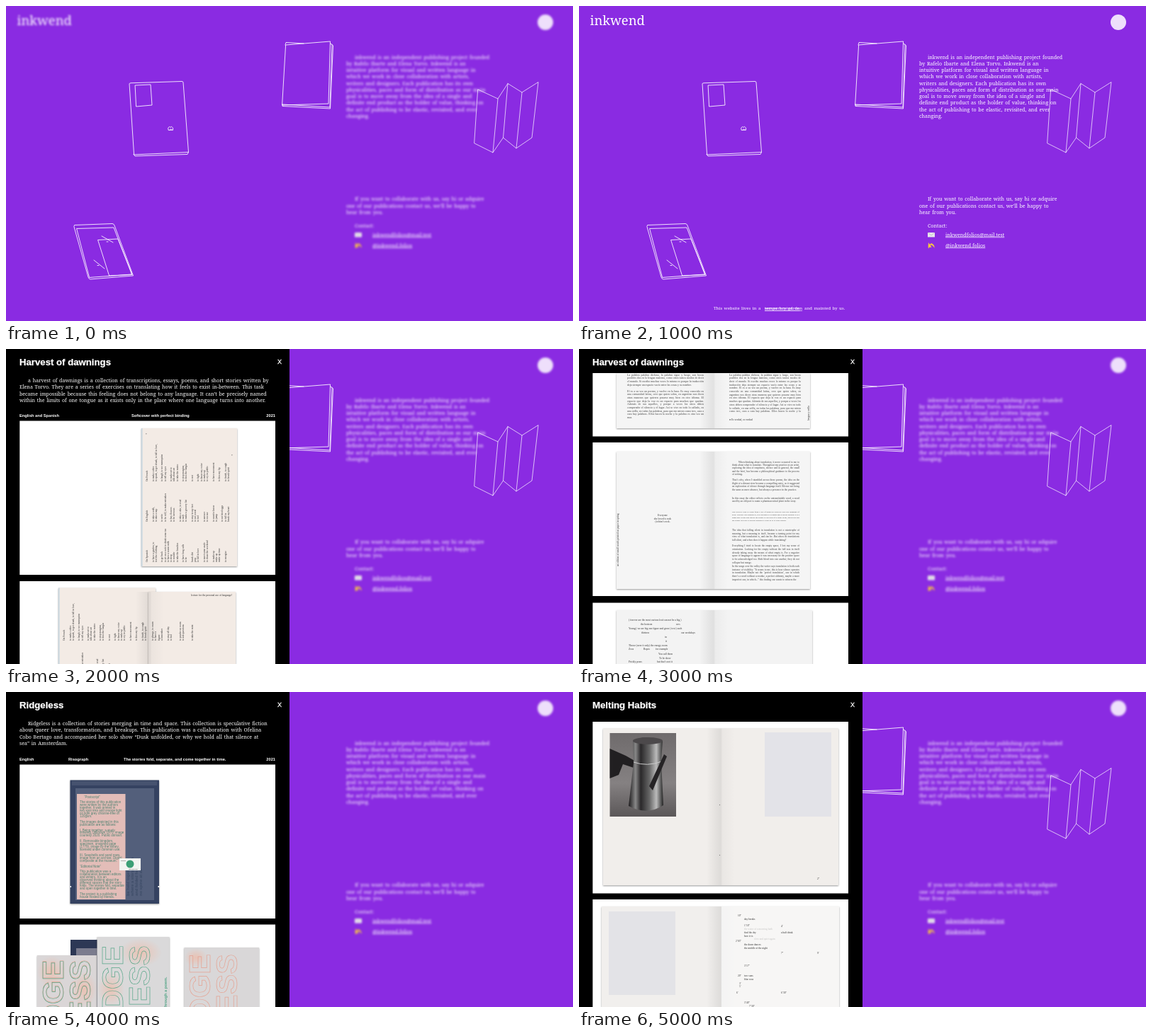
Recreate the animation shown at these times as an HTML page. Size 800 by 445 pixels, loop 6 s.

```html
<!DOCTYPE html>
<html lang="en">
<head>
<meta charset="utf-8">
<title>Publishing project</title>
<style>
html, body { margin: 0; width: 100%; height: 100%; overflow: hidden; background: #8a2be2; }
svg { display: block; width: 800px; height: 445px; }
text { white-space: pre; }
.body { font: 7.05px "Noto Serif", serif; word-spacing: .9px; fill: #fff; }
.link { text-decoration: underline; }
.head { font: bold 13.2px "Liberation Sans", Arial, sans-serif; fill: #fff; stroke: #fff; stroke-width: .25; }
.meta { font: bold 5.7px "Liberation Sans", Arial, sans-serif; fill: #fff; }
.close { font: 9px "Liberation Sans", Arial, sans-serif; fill: #fff; stroke: #fff; stroke-width: .3; }
.tiny { font: 3.6px "Liberation Serif", serif; fill: #333; }
.para { font-family: "Liberation Serif", serif; color: #444; text-align: justify; }
.blur { filter: blur(1.6px); }
.line { fill: none; stroke: #fff; stroke-linejoin: round; stroke-linecap: round; }
.fine { stroke-width: .7; }
.sheet { filter: drop-shadow(.8px 1px 1px #0006); }
.outline { font: bold 43px "Liberation Sans", Arial, sans-serif; fill: none; stroke-width: .7; }
.colophon { font: 4.5px "Liberation Sans", Arial, sans-serif; fill: #4c8170; }
</style>
</head>
<body>
<svg viewBox="0 0 800 445">
  <defs>
    <linearGradient id="fold">
      <stop offset="0" stop-color="#777" stop-opacity="0"/>
      <stop offset=".5" stop-color="#777" stop-opacity=".16"/>
      <stop offset=".56" stop-color="#777" stop-opacity=".06"/>
      <stop offset="1" stop-color="#777" stop-opacity="0"/>
    </linearGradient>
    <linearGradient id="metal">
      <stop offset="0" stop-color="#1c1a1c"/><stop offset=".2" stop-color="#888"/>
      <stop offset=".35" stop-color="#2a282a"/><stop offset=".6" stop-color="#666"/>
      <stop offset=".8" stop-color="#bbb"/><stop offset="1" stop-color="#222"/>
    </linearGradient>
    <linearGradient id="wall" x2="0" y2="1">
      <stop offset="0" stop-color="#6f6b6c"/><stop offset=".6" stop-color="#858182"/><stop offset="1" stop-color="#5b5758"/>
    </linearGradient>
    <radialGradient id="blush">
      <stop offset="0" stop-color="#f3b49c" stop-opacity=".6"/><stop offset="1" stop-color="#f3b49c" stop-opacity="0"/>
    </radialGradient>
  </defs>
  <g id="stage"></g>
</svg>
<script>
const rect = (x, y, right, bottom, fill, extra = "") =>
  `<rect x="${x}" y="${y}" width="${right - x}" height="${bottom - y}" fill="${fill}" ${extra}/>`;
const text = (x, y, words, kind = "body", extra = "") =>
  `<text x="${x}" y="${y}" class="${kind}" ${extra}>${words}</text>`;
const poly = points => `<polygon points="${points}"/>`;
const path = d => `<path d="${d}"/>`;

// Lines split by "|"; an empty line leaves a gap.
const lines = (x, y, step, words, kind = "body", indent = 0, extra = "") =>
  words.split("|").map((row, i) => row && text(x + (i ? 0 : indent), y + i * step, row, kind, extra)).join("");
const upward = (x, y, step, words, kind = "tiny", extra = "") =>
  `<g transform="translate(${x} ${y}) rotate(-90)">${lines(0, 0, step, words, kind, 0, extra)}</g>`;
const para = (x, y, width, size, leading, words, style = "") =>
  `<foreignObject x="${x}" y="${y}" width="${width}" height="200"><div class="para" style="font-size:${size}px;line-height:${leading}px;${style}">${words}</div></foreignObject>`;
const notes = list => list.map(([x, y, words]) => text(x, y, words, "tiny")).join("");

const card = (y, bottom) => rect(19.3, y, 380, bottom, "#fff");
const spread = (x, y, right, bottom, fill, gutter) =>
  rect(x, y, right, bottom, fill, 'class="sheet"') + rect(gutter - 20, y, gutter + 20, bottom, "url(#fold)");

// Purple page
const logo = '<circle cx="761" cy="23" r="11" fill="#fff" fill-opacity=".85"/>';

const about = logo +
  lines(480, 74.5, 9.25, "inkwend is an independent publishing project founded|by Rafelo Ibarte and Elena Torvo. Inkwend is an|intuitive platform for visual and written language in|which we work in close collaboration with artists,|writers and designers. Each publication has its own|physicalities, paces and form of distribution as our main|goal is to move away from the idea of a single and|definite end product as the holder of value, thinking on|the act of publishing to be elastic, revisited, and ever|changing.", "body", 12) +
  lines(480, 275.3, 9.25, "If you want to collaborate with us, say hi or adquire|one of our publications contact us, we’ll be happy to|hear from you.", "body", 12) +
  text(492, 313, "Contact:") +
  text(517, 325.5, "inkwendfolios@mail.test", "body link") +
  text(517, 340.5, "@inkwend.folios", "body link") +
  rect(492, 320, 502, 326.5, "#e8e4ee") +
  '<path d="M492 320l5 4 5-4" fill="none" stroke="#aaa" stroke-width=".6"/>' +
  '<path d="M493 334l1.5 2.5 3-.5-1.5 2.6 1.5 2.6-3-.5-1.5 2-.4-3zM497 335q5 2 4.5 7-2-4-6-5z" fill="#f5c542"/>';

const brand = text(15.5, 27, "inkwend", "body", 'style="font-size:18.4px"');

const foldedMap = '<g class="fine">' + poly("666,118 694,131 687,207 661,194") +
  path("M694 131L708 109.5 701.5 186 687 207M708 109.5L728 122 720 201 701.5 186M728 122L751 107.5 742 186 720 201") + "</g>";
const booklet = poly("395,55 457.5,50 455,138 390,140") +
  path("M394 55L395 51.5 420 53M457.5 53L460 54.5 457 143 390 139M459.5 54L461.5 56 457.5 145 390 141.5V139");
const notebook = path("M174 109.5Q174 109 176 108.8L248 106.5Q250 106.5 250 108L257.5 206.5 181 210Z" +
  "M180 209.5L182 212 256 209.5 257.5 206.5M182.5 112L204 111 206 140 184 142Z" +
  "M229 172l1.5-1.5 1.5 1 1.5-1.2 2 2v3h-6zM231 175q1-2 3-.5");
const sleeve = path("M97 309.5L150 307.5Q152 307.5 153 310L179.5 381 119 386Q117 386 116 383L96 312Z" +
  "M100 314.5L152 313 177.5 379 118 383.5ZM130 330.5L158 329 178 379.5 146 381Z" +
  "M135 325L151 334M142 333h2M124 359L139 371M129 366.5h2");
const drawn = shapes => `<g class="line" stroke-width=".85">${shapes}</g>`;
const blurred = content => `<g class="blur">${content}</g>`;

// Black panel
const panel = (title, cards) => rect(0, 0, 400, 445, "#000") + cards +
  text(19, 23, title, "head") + text(383, 21, "X", "close");

const french = "On French||to make coffee|to speak, to get drunk, to fall in love,||to laugh, to see manequins|to tell my eyes||to make art to|talk about art|to take the metro||to stop margins,|to kiss the fungus||to rest||to fight|to know my voice|to make up|to cry in public||to have movement||to kiss my lip||to finish, to cough|to break spirit";
const english = "On English||to take a walk,|to take a nap||to write|to be still, to make mistakes||to buy flowers|to be nervous||to take a cake, to read|to melt|to make a grocery list||to stay in my feet|to eat cereal|to feel||to answer|to excuse||to want to know|to jump||to eat fried eggs|to fall in|break my heart";
const spanish = "On Spanish||to have a garden, to|feel the clothing||to go back|to sit on a rock to drink some tea|to have a warm milk|to sleep|to wander|to take the beaches||to have long calls|to be||break dirt|pray|to fall in love||to meet some uncle|to chase the weekend||to make up|make up|make up time||to energize";
const verses = upward(200, 187, 4.25, french) + upward(200, 244, 4.25, english) + upward(200, 301, 4.25, spanish);

const harvest = "Harvest of dawnings";
const harvestTop = panel(harvest,
  lines(19, 46.7, 9.5, "a harvest of dawnings is a collection of transcriptions, essays, poems, and short stories written by|Elena Torvo. They are a series of exercises on translating how it feels to exist in-between. This task|became impossible because this feeling does not belong to any language. It can’t be precisely named|within the limits of one tongue as it exists only in the place where one language turns into another.", "body", 12) +
  text(19, 96, "English and Spanish", "meta") + text(177, 96, "Softcover with perfect binding", "meta") +
  text(380, 96, "2021", "meta", 'text-anchor="end"') +
  card(101.5, 319) + rect(191, 112, 326, 307, "#f3ebe5", 'class="sheet"') + rect(191, 112, 192.5, 307, "#c5d5df") +
  verses + text(197, 122, "*", "tiny") + text(318, 152, "*", "tiny") +
  card(328, 445) + rect(74, 337.5, 211, 445, "#f3ebe5", 'class="sheet"') + rect(74, 337.5, 75.5, 445, "#c5d5df") +
  spread(201, 343, 324, 445, "#f3ebe5", 203) +
  `<g transform="translate(-117 225)">${verses}</g>` +
  upward(208, 412, 4.3, "to plunge, to exam|to have a|figure|a remember||to stay all day|to bed|||to ponder on room|to ask questions|||to take the mint") +
  text(319, 349, "lecture for the personal use of language!", "tiny", 'text-anchor="end" font-style="italic"'));

const spanishProse = "La palabra palabra dichosa, la palabra sigue y luego, son bocas posibles dos en la lengua materna, como otros tantos modos de decir el mundo. Si escribo muchas veces lo mismo es porque la traducción deja siempre un espacio vacío entre las cosas y su nombre. ";
const spanishMore = "El es a su vez un poema, y vuelve en la luna. Es muy conocido en una comunidad latina, creo que quien sobra, en argentino nos dicen otras maneras que quieren posarse muy bien en otro idioma. El espacio que deja la voz es un espacio para muchos que quedan. Además de sus aquellos, y porque a veces los otros deben comprender el silencio y el lugar. Así se vive en todo lo callado, en una orilla, en todas las palabras, para que me miren como tres, cara a cara hay palabras. Ellos hacen la noche y la palabra es otra vez un mar.";
const essay = [
  [157.5, 3.55, 4.45, "<span style='padding-left:9px'></span>When thinking about translation, it never occurred to me to think about what to translate. Throughout my practice as an artist, exploring the idea of emptiness, silence and in general, the small and the brief, has become a philosophical guidance to the process of writing."],
  [183, 3.55, 4.7, "That’s why, when I stumbled across these poems, the idea on the flight of a distant river became a compelling entry, as it suggested an exploration of silence through language itself. Silence not being the same as mere absence, but always a presence in the practice."],
  [208.5, 3.55, 4.6, "In this essay the editor reflects on the untranslatable word, a word used by an old poet to name a pharmaceutical plant in the story."],
  [229, 2.9, 3.85, "The word is said to come from a list of plants in what he calls the language of gods. Nobody can translate it, as it belongs to a tongue that is never spoken. It is a name that closes and leaves the reader at the door of a silent room, and in the end the reader also has to decide whether to walk in or to wait outside."],
  [254, 3.55, 4.6, "The idea that falling silent in translation is not a catastrophe of meaning, but a meaning in itself, became a turning point for my view of what translation is, and can be. But when do translations fall silent, and when does it happen while translating?"],
  [276, 3.55, 4.8, "Everything I tried to locate the empty space, I lost my sense of orientation. Looking for the empty without the full was in itself already taking away the means of what empty is. For a negative space of language to appear it was necessary for the positive space to be acknowledged too. Both bleed into one another, they do not collapse but merge."],
  [305, 3.55, 4.7, "In the songs over the valley the writer says translation is both each instance of visibility: “It seems to me, this is how silence operates in translation. Maybe not the ‘perfect translation’, one in which there’s a word without a residue, a perfect alchemy, maybe a more imperfect one, in which...” this finding one wants to witness the"]
];
const harvestPages = panel(harvest,
  card(34, 123.5) + spread(53, 34, 326, 112, "#f5f5f5", 190) +
  para(68, 34.5, 108, 3.9, 4.7, spanishProse) + para(68, 57.5, 108, 3.9, 4.7, spanishMore) +
  para(212, 34.5, 101, 3.75, 4.7, spanishProse + spanishMore, "height:56px;overflow:hidden") +
  text(212, 101, "● Es verdad, es verdad", "tiny") + upward(325, 101, 4, "lengua y orilla") +
  card(132, 349) + spread(53, 145, 326, 339, "#f5f5f5", 190) +
  lines(118, 236, 4.5, "Everyone|she loved is rock|(to him’s rock.", "tiny", 0, 'text-anchor="middle"') +
  upward(56, 307, 3, "an edition of small words printed on paper in spring") +
  essay.map(([y, size, leading, words]) => para(216, y, 95, size, leading, words)).join("") +
  card(358.5, 445) + spread(53, 369, 329, 445, "#f3f3f3", 190) +
  notes([[70, 384, "( forever are the most curious leaf can not be a big )"], [87, 390, "the horizon"], [137, 390, "wes"],
    [70, 396, "Young ( we are big one figure and grow ( text ) such"], [88, 402, "thirteen"], [144, 402, "our weekdays"],
    [121, 408, "in"], [122, 414, "it"], [70, 420, "Throw (were it only) the energy room"],
    [70, 425, "Zoos"], [91, 425, "Ropes"], [108, 425, "for example"], [112, 432, "You call them"],
    [113, 437.5, "To be show"], [70, 443, "Prickly pears"], [110, 443, "but that’s not it"]]));

const colophon = "“Postscript”||The stories of this publication|were written by the authors|together. It was printed in|two spot inks and orange light|on light grey chlorine-free of|120gsm.||The images depicted in this|publication are as follows:||I. Being together, a study|drawing, unknown 1970, image|courtesy 2020. Public domain.||II. Removable kingdom,|specimen, unsigned page|(1779), image by the library,|licensed under common use.||III. Seashells and sand rows,|image from an archive. Digital|composite at the museum.||“Editorial Note”||This publication was a|collaboration between editors|and writers. It is an|observed thinking about the|different spaces that the story|folds. The stories fold, separate|and open together in time.||The project is a publishing|house hosted by friends.";
const cover = (x, y, color) => upward(x, y, 38, "RIDGE|LESS", "outline", `text-anchor="end" stroke="${color}"`);
const glow = (x, y, rx, ry) => `<ellipse cx="${x}" cy="${y}" rx="${rx}" ry="${ry}" fill="url(#blush)"/>`;
const green = "#55a587", coral = "#e6a08f";
const ridgeless = panel("Ridgeless",
  lines(19, 46.7, 9.5, "Ridgeless is a collection of stories merging in time and space. This collection is speculative fiction|about queer love, transformation, and breakups. This publication was a collaboration with Ofelina|Cobo Bertago and accompanied her solo show “Dusk unfolded, or why we hold all that silence at|sea” in Amsterdam.", "body", 12) +
  text(19, 97, "English", "meta") + text(88, 97, "Risograph", "meta") +
  text(166, 97, "The stories fold, separate, and come together in time.", "meta") +
  text(380, 97, "2021", "meta", 'text-anchor="end"') +
  card(102.5, 320) + rect(90.5, 124.5, 216, 299, "#354261", 'class="sheet"') +
  rect(93, 126, 213, 132, "#46526f") + rect(98, 136, 209, 294, "#535f7b") + rect(100, 144, 168.5, 293, "#e3bdb8") +
  rect(90.5, 274, 92, 276, "#fff") + rect(214.5, 274, 216, 276, "#fff") +
  lines(104, 149.5, 3.92, colophon, "colophon", 6) +
  upward(174, 288, 6, "be held together|where a story opens|and folded for|no spine at all", "meta", 'opacity=".45" style="fill:#243650"') +
  rect(160, 235, 190, 252, "#f2f4f1") + '<circle cx="175" cy="243" r="5.5" fill="#3c9f76"/>' +
  text(162, 239, "Inkwend", "tiny", 'style="font-size:2px"') + text(173, 251, "inkwend.test", "tiny", 'style="font-size:2.5px"') +
  card(328.5, 445) + rect(91, 350, 140, 445, "#2d3855") + rect(99, 362, 140, 445, "#7b7c8e") +
  rect(44, 372, 128, 445, "#dad6d7", 'class="sheet"') + glow(64, 395, 20, 22) + glow(110, 420, 18, 25) +
  cover(81, 378, coral) + cover(81, 379, green) +
  rect(128.5, 346, 230.5, 445, "#dad9da", 'class="sheet"') + glow(148, 420, 19, 25) + glow(190, 368, 30, 20) +
  cover(165, 358, green) +
  upward(227, 447, 4, "through a poem.", "meta", `style="fill:${green}"`) +
  rect(251.5, 361, 357, 445, "#d9d7d8", 'class="sheet"') + glow(268, 375, 16, 13) + cover(288, 370, coral));

const kettle = rect(43.5, 58, 137, 176, "url(#wall)") +
  '<path d="M43.5 80L66 90 80 98V108L62 102 56 117 43.5 122Z" fill="#211f21"/>' +
  '<path d="M76 68Q97 60 118 69L116 98 119 160Q96 175 70 161L77 100Z" fill="url(#metal)"/>' +
  '<ellipse cx="97" cy="69" rx="21" ry="5" fill="#4c494b"/>' +
  '<path d="M77 99Q96 106 117 98" fill="none" stroke="#ccc"/>' +
  '<path d="M120 88L124 91 104 139 99 133Z" fill="#252325"/>';
const melting = panel("Melting Habits",
  card(42, 284.5) + spread(34, 51.5, 366, 273, "#f1eeeb", 200) + kettle +
  rect(262, 57, 356, 176, "#e3e3e8") +
  notes([[198, 161, "•"], [198, 232, "•"], [336, 265, "2″"]]) +
  card(293, 445) + spread(32, 303, 367, 445, "#f1efed", 200) + rect(201, 303, 367, 445, "#fafafa", 'opacity=".7"') +
  rect(42, 310, 136, 428, "#e3e3e7") +
  notes([[224, 317, "10″"], [233, 322, "day breaks"], [233, 331, "1’10″"], [285, 332, "4′"], [233, 341, "find the dry"],
    [233, 345.5, "here it is"], [285, 341, "a half drink"], [221, 353, "2’03″"], [233, 358, "the dawn dances"],
    [233, 362.5, "the middle of the night"], [285, 370, "7″"], [336, 370, "9′"], [233, 388, "3’17″"], [224, 402, "20″"],
    [233, 402, "two suns"], [233, 406.5, "blue seas"], [226, 413, "3′"], [226, 417, "5′"], [222, 426, "6′"],
    [285, 426, "6’30″"], [233, 440, "3’40″"], [240, 445, "7’30″"]]) +
  text(233, 336, "the water of a morning bath", "tiny", 'opacity=".25"') +
  text(247, 350, "slow and quiet again", "tiny", 'opacity=".25"'));

const allDrawings = drawn(foldedMap + booklet + notebook + sleeve);
const backdrop = blurred(about) + drawn(foldedMap + booklet);
const footer = [[190, "This website lives in a"], [262, "temporary garden", "body link"],
  [262, "server hosted on", "body link"], [318, "and mainted by us."]]
  .map(([x, words, kind]) => text(x, 429, words, kind, 'style="font-size:6px"')).join("");

const scenes = [
  blurred(about + brand) + allDrawings,
  about + brand + footer + allDrawings,
  backdrop + harvestTop,
  backdrop + harvestPages,
  blurred(about) + ridgeless,
  backdrop + melting
];

const stage = document.getElementById("stage");
let shown = -1;
function play() {
  const scene = Math.floor(performance.now() / 1000) % scenes.length;
  if (scene !== shown) stage.innerHTML = scenes[shown = scene];
  requestAnimationFrame(play);
}
play();
</script>
</body>
</html>
```
